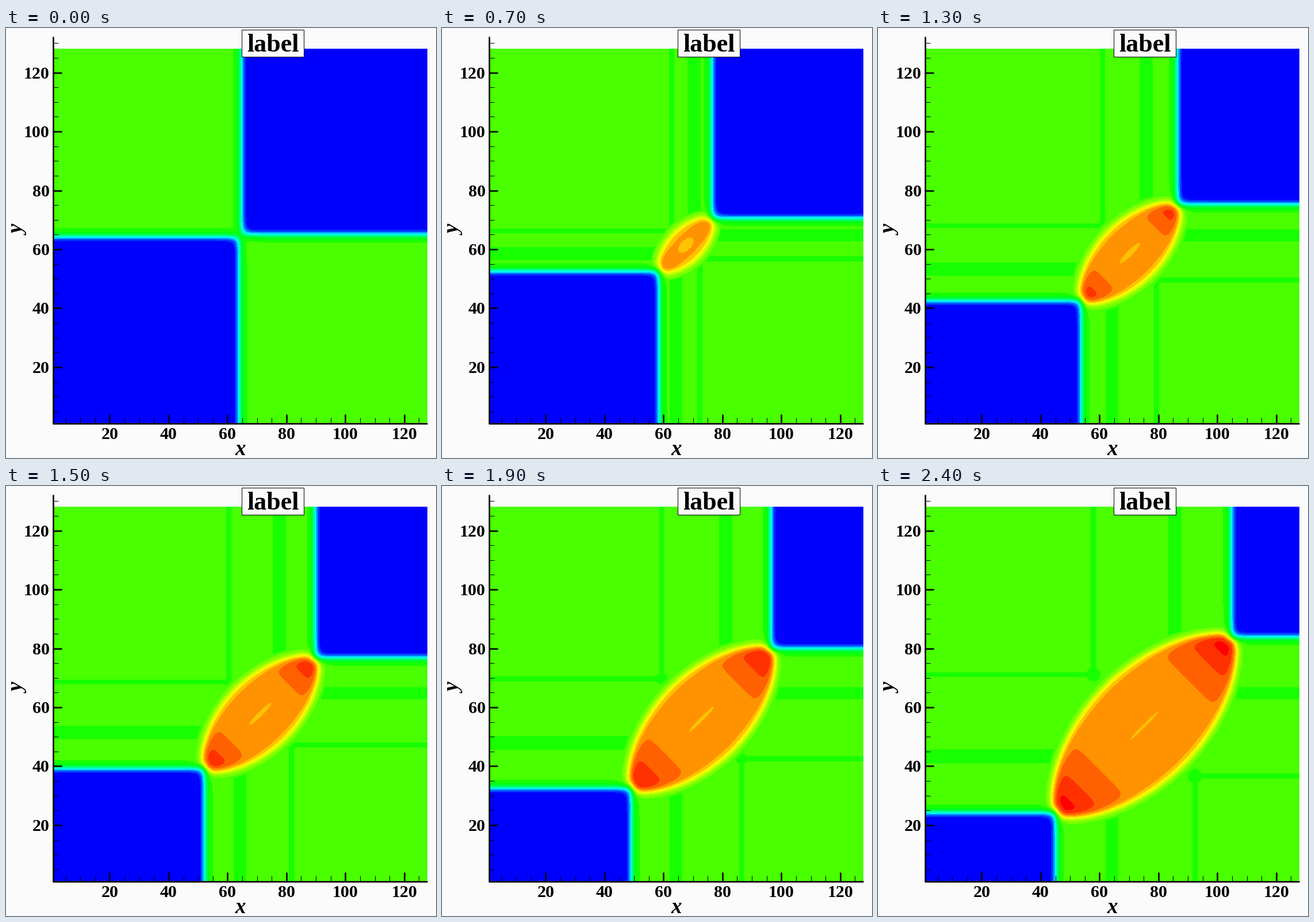
Animation of 748 by 748 pixels, one loop 2500 ms. Source, as a matplotlib script:

```python
import numpy as np
import matplotlib.pyplot as plt
from matplotlib.animation import FuncAnimation
from matplotlib.patches import Rectangle

SIZE, DPI = 748, 64
FRAMES, STEP = 25, 100
PAPER = "#fbfbfb"
LEFT, RIGHT, TOP, BOTTOM = 83, 733, 36, 687
CALM = 12.3          # contour band of the undisturbed high-density state


def px_x(v):
    return 78 + 5.123 * v


def px_y(v):
    return 692.4 - 5.123 * v


def rainbow(n=22):
    """Blue - cyan - green - yellow - red in n flat bands."""
    c = np.linspace(0, 4, n)
    r = np.clip(c - 2, 0, 1)
    g = np.clip(np.minimum(c, 4 - c), 0, 1)
    b = np.clip(2 - c, 0, 1)
    return np.round(255 * np.stack([r, g, b], axis=1)).astype(np.uint8)


BANDS = rainbow()
# pixels right of and below the middle; the flow is unchanged when P and Q swap
P, Q = np.meshgrid(np.arange(LEFT, RIGHT) + 0.5 - 408,
                   np.arange(TOP, BOTTOM) + 0.5 - 361.5)


def corner(sx, sy, k=6):
    """Shock front around a quadrant: 0 in the low state, 1 behind the shock."""
    s = -k * np.logaddexp(-sx / k, -sy / k)
    return 0.5 * (1 - np.tanh(s / np.where(s < 0, 8, 6)))


def lens(t):
    """Distance to the lens edge (positive inside), and coordinates along its axes."""
    mid = 2.29 * t - 2
    dx, dy = P - mid, Q - mid
    a, b = np.abs(dx - dy) / np.sqrt(2), np.abs(dx + dy) / np.sqrt(2)
    length, width, n = 9 * t - 7, 3.88 * t, 1.37
    q = b / width
    f = q ** n + (a / length) ** 2 - 1
    slope = np.hypot(n / width * q ** (n - 1), 2 * a / length ** 2)
    return np.clip(-f / (slope + 1e-6), -300, 300), a, b, a / length


def stripes(t, d):
    """Faint waves shed by the four shocks at start-up."""
    mid = 2.29 * t - 2
    near, far = 3 - 1.46 * t, 6.05 * t - 8
    mask = np.hypot(P - near, Q - near) < 0.5 * t
    mask |= np.hypot(P - far, Q - far) < 0.5 * t
    for u, v in ((P, Q), (Q, P)):
        mask |= (np.abs(u - near) < 4.2) & (v < near)
        mask |= (np.abs(u - far) < 4.5) & (v > far)
        mask |= (np.abs(u + 6 - 4.58 * t) < 11.6) & (v < mid)
        mask |= (np.abs(u + 1) < 11) & (v > mid)
    return mask & (d < -min(14, 1.5 * t))


def field(t):
    fast, slow = 8.55 * t - 6.5, 1.2 - 4.02 * t
    calm = np.minimum(corner(P - fast, slow - Q), corner(slow - P, Q - fast))

    d, a, b, r = lens(t)
    peak = 18.45 - 9 * np.exp(-t / 2.2)
    tips = 4.4 * (1 - np.exp(-t / 6.5)) * np.minimum(r, 1) ** 3
    rise = 0.5 * (1 + np.tanh(d / 9))
    v = CALM * calm + (peak + tips - CALM) * rise * calm ** 2

    # thin seam of lower density along the middle of the lens
    seam_a = 44 * (1 - np.exp(-t / 17))
    seam_b = 2.3 + 25 * np.exp(-t / 6)
    seam = (a / seam_a) ** 2 + (b / seam_b) ** 2 < 1
    v = np.where(seam, np.minimum(v, 17.5), v)
    return np.where(stripes(t, d), np.minimum(v, 11.4), v)


def picture(i):
    band = np.clip(np.floor(field(i + 1.0)), 0, len(BANDS) - 1)
    return BANDS[band.astype(int)]


fig = plt.figure(figsize=(SIZE / DPI, SIZE / DPI), dpi=DPI, facecolor=PAPER)
ax = fig.add_axes([0, 0, 1, 1])
image = ax.imshow(picture(0), extent=(LEFT, RIGHT, BOTTOM, TOP),
                  interpolation="nearest", aspect="auto")
ax.set_xlim(0, SIZE)
ax.set_ylim(SIZE, 0)
ax.axis("off")


def line(x, y, width):
    ax.plot(x, y, color="black", lw=width * 72 / DPI,
            solid_capstyle="butt", zorder=3)


def text(x, y, s, size, **kw):
    opts = dict(ha="center", va="baseline", weight="bold", color="black",
                family="Liberation Serif", zorder=5)
    ax.text(x, y, s, fontsize=size * 72 / DPI, **{**opts, **kw})


line([82.5, 82.5], [15, 688], 2.6)
line([81.5, RIGHT], [687.5, 687.5], 2.6)
for v in range(5, 131, 5):
    major = v % 20 == 0
    size, width = (15, 2.6) if major else (9, 1)
    line([82, 82 + size], [px_y(v)] * 2, width)
    if v < 128:
        line([px_x(v)] * 2, [687, 687 - size], width)
    if major:
        text(px_x(v), 715, str(v), 30)
        text(76, px_y(v) + 10, str(v), 30, ha="right")

text(408, 743, "x", 37, style="italic")
text(31.5, 352, "y", 37, style="italic", rotation=90, rotation_mode="anchor")
ax.add_patch(Rectangle((410.5, 2.5), 108, 47, facecolor=PAPER,
                       edgecolor="black", lw=72 / DPI, zorder=4))
text(464.5, 41, "label", 44)


def draw(i):
    image.set_data(picture(i))
    return (image,)


anim = FuncAnimation(fig, draw, frames=FRAMES, interval=STEP, repeat=True)
plt.show()
```
